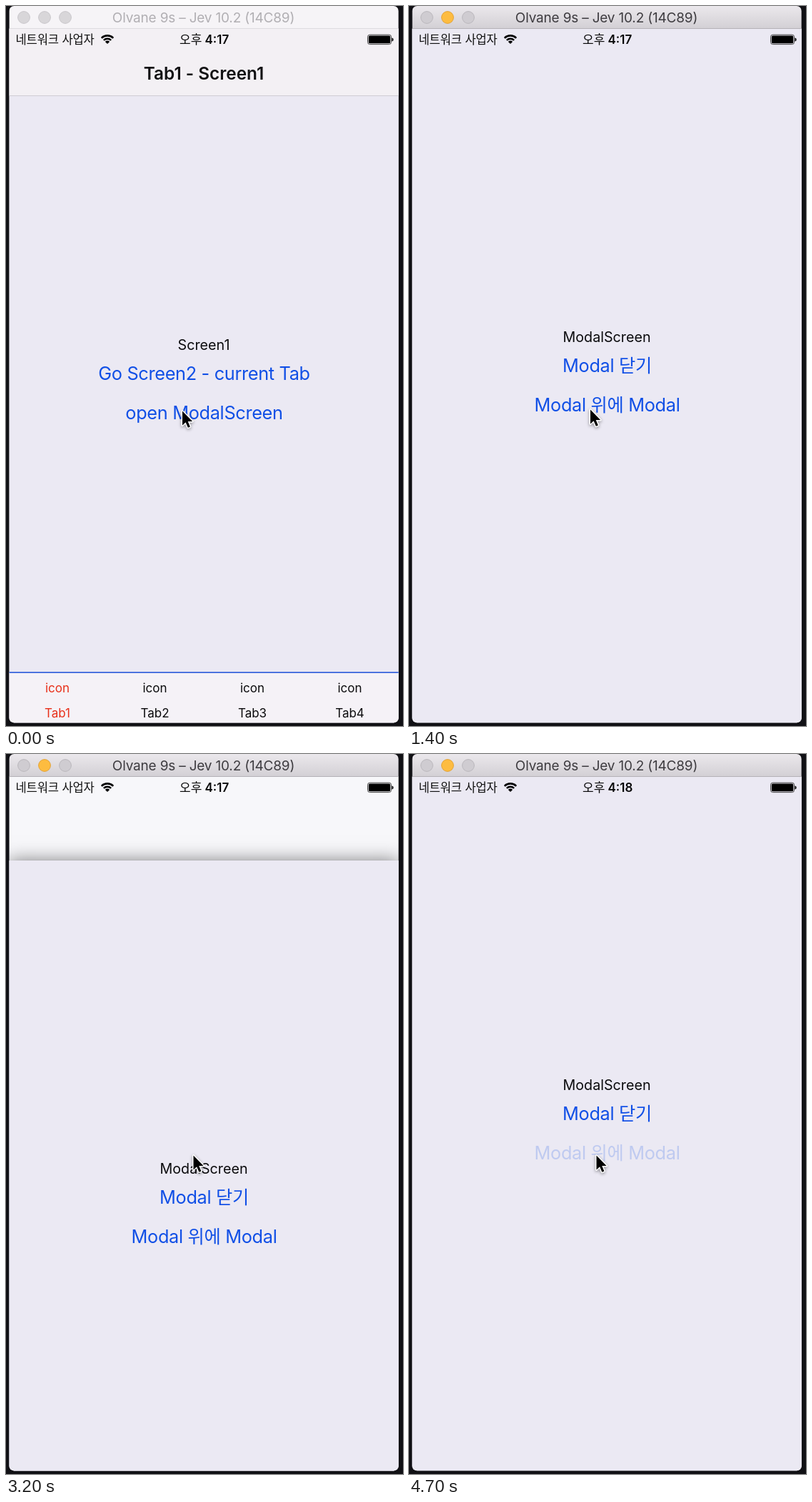
Recreate the animation shown at these times as an HTML page with a canvas. Size 556x1007 px, loop 5100 ms.

```html
<!DOCTYPE html>
<html lang="ko">
<head>
<meta charset="utf-8">
<title>Modal navigation</title>
<style>
html, body { margin: 0; width: 100%; height: 100%; overflow: hidden; background: #111115; }
canvas { display: block; width: 556px; height: 1007px; }
</style>
</head>
<body>
<canvas id="stage" width="556" height="1007"></canvas>
<script>
const ctx = document.getElementById('stage').getContext('2d');
const LOOP = 5100, STEP = 100, LAST = 4700;
const WIN = { x: 4.4, y: 0, w: 545.4, h: 1002.4 };
const TOP = 32, MID = 277.5, VIEW_H = WIN.h - TOP;
const FONT = 'Inter, "Noto Sans CJK KR", "Noto Sans CJK", sans-serif';
const BG = '#ebe9f3', BLUE = '#104fe6', INK = '#0b0b0d', RED = '#e8301a';

const clamp = v => Math.min(1, Math.max(0, v));
const mix = (a, b, k) => a + (b - a) * k;
const easeInOut = k => k < 0.5 ? 2 * k * k : 1 - 2 * (1 - k) ** 2;

// Cubic bezier easing solved by bisection.
function slideEase(x) {
  const curve = (s, a, b) => 3 * (1 - s) ** 2 * s * a + 3 * (1 - s) * s * s * b + s ** 3;
  let lo = 0, hi = 1;
  for (let i = 0; i < 24; i++) {
    const s = (lo + hi) / 2;
    if (curve(s, 0.2833, 0.31833) < x) lo = s; else hi = s;
  }
  return curve(lo, 0.99, 0.99);
}

const slide = (t, start) => slideEase(clamp((t - start) / 500));

function pressOpacity(t, down, up = Infinity) {
  if (t > up) return mix(0.2, 1, easeInOut(clamp((t - up) / 250)));
  return mix(1, 0.2, easeInOut(clamp((t - down) / 150)));
}

const cursorPath = [[0, 247, 566.5], [1200, 247, 566.5], [1400, 254, 564.5], [1800, 254, 564.5], [2200, 262.5, 561.5]];

function cursorAt(t) {
  const i = cursorPath.findIndex(k => k[0] > t);
  if (i < 0) return cursorPath[cursorPath.length - 1].slice(1);
  const [t0, x0, y0] = cursorPath[i - 1], [t1, x1, y1] = cursorPath[i];
  const k = (t - t0) / (t1 - t0);
  return [mix(x0, x1, k), mix(y0, y1, k)];
}

function rect(x, y, w, h, color) {
  ctx.fillStyle = color;
  ctx.fillRect(x, y, w, h);
}

function label(text, x, y, size, color, { weight = 400, track = 0, align = 'center' } = {}) {
  ctx.font = `${weight} ${size}px ${FONT}`;
  ctx.letterSpacing = `${track * size}px`;
  ctx.textAlign = align;
  ctx.fillStyle = color;
  ctx.fillText(text, x, y);
}

function button(text, y, opacity = 1) {
  ctx.save();
  ctx.globalAlpha *= opacity;
  label(text, MID, y, 25.3, BLUE, { track: -0.013 });
  ctx.restore();
}

const caption = (text, y) => label(text, MID - 0.5, y, 19.7, INK);

function homeScreen(opacity) {
  rect(WIN.x, TOP, WIN.w, VIEW_H, BG);
  rect(WIN.x, TOP, WIN.w, 93, '#f3f0f4');
  rect(WIN.x, 125, WIN.w, 1, '#cfcdd3');
  label('Tab1 - Screen1', MID - 0.5, 102.5, 24.3, '#111113', { weight: 600 });
  caption('Screen1', 481);
  button('Go Screen2 - current Tab', 523);
  button('open ModalScreen', 578, opacity);
  rect(WIN.x, 932, WIN.w, 71, '#f5f2f7');
  rect(WIN.x, 931.4, WIN.w, 1.45, '#1549d8');
  for (let i = 0; i < 4; i++) {
    const x = 72 + i * 136.5, color = i ? INK : RED;
    label('icon', x, 960, 17, color);
    label('Tab' + (i + 1), x, 994.5, 17, color);
  }
}

function modalScreen(opacity) {
  rect(WIN.x, TOP, WIN.w, VIEW_H, BG);
  caption('ModalScreen', 470);
  button('Modal 닫기', 512);
  button('Modal 위에 Modal', 567, opacity);
}

// The lower card fades towards white while the upper one slides in.
function stack(progress, lower, upper) {
  rect(WIN.x, TOP, WIN.w, VIEW_H, '#fff');
  ctx.save();
  ctx.globalAlpha = mix(1, 0.3, progress);
  lower();
  ctx.restore();
  if (progress <= 0) return;
  const offset = Math.round((1 - progress) * VIEW_H);
  ctx.save();
  ctx.translate(0, offset);
  ctx.shadowColor = 'rgba(0,0,0,0.5)';
  ctx.shadowBlur = 24;
  rect(WIN.x, TOP, WIN.w, VIEW_H, BG);
  ctx.shadowColor = 'transparent';
  upper();
  ctx.restore();
}

function wifi(x, y) {
  ctx.fillStyle = '#000';
  for (const [inner, outer] of [[0, 4.4], [6, 8.5], [10.3, 12.9]]) {
    ctx.beginPath();
    ctx.arc(x, y, outer, -Math.PI * 0.75, -Math.PI * 0.25);
    ctx.arc(x, y, inner, -Math.PI * 0.25, -Math.PI * 0.75, true);
    ctx.fill();
  }
}

function roundBox(x, y, w, h, r) {
  ctx.beginPath();
  ctx.roundRect(x, y, w, h, r);
}

function statusBar(time) {
  label('네트워크 사업자', 13.5, 52.5, 16.6, '#111', { align: 'left', track: -0.01 });
  wifi(142, 53);
  label('오후', 243, 53, 17, '#080808', { weight: 500, align: 'left' });
  label(time, 278.5, 53, 17, '#080808', { weight: 600, align: 'left' });
  ctx.strokeStyle = '#444';
  ctx.lineWidth = 1;
  roundBox(506.5, 40.2, 33, 13.4, 3);
  ctx.stroke();
  ctx.fillStyle = '#000';
  roundBox(507.8, 41.5, 30.4, 10.8, 1.5);
  ctx.fill();
  roundBox(540.5, 44.5, 2, 5, [0, 2, 2, 0]);
  ctx.fill();
}

function titleBar(active) {
  const shade = ctx.createLinearGradient(0, 0, 0, 31);
  shade.addColorStop(0, active ? '#ebe8ec' : '#f6f4f7');
  shade.addColorStop(1, active ? '#d3d0d5' : '#f6f4f7');
  rect(WIN.x, 0, WIN.w, TOP, shade);
  rect(WIN.x, 31, WIN.w, 1, active ? '#b4b1b7' : '#dedce0');
  for (let i = 0; i < 3; i++) {
    const lit = active && i === 1;
    ctx.beginPath();
    ctx.arc(25 + i * 29, 16, 8.4, 0, Math.PI * 2);
    ctx.fillStyle = lit ? '#fdbc40' : active ? '#cfccd1' : '#d8d6d9';
    ctx.fill();
    ctx.strokeStyle = lit ? '#e2a237' : active ? '#bab7bc' : '#c8c6ca';
    ctx.lineWidth = 1;
    ctx.stroke();
  }
  label('Olvane 9s – Jev 10.2 (14C89)', 276.5, 23.3, 19, active ? '#3e3c40' : '#b1afb3', { track: -0.01 });
}

function cursor(x, y) {
  const arrow = new Path2D('M0 0V16L3.7 12.5L6.3 18.5L8.7 17.5L6.2 11.6H11.3Z');
  ctx.save();
  ctx.translate(x, y);
  ctx.scale(1.25, 1.25);
  ctx.lineJoin = 'round';
  ctx.lineWidth = 2.4;
  ctx.strokeStyle = '#fff';
  ctx.shadowColor = 'rgba(0,0,0,0.4)';
  ctx.shadowBlur = 4;
  ctx.shadowOffsetY = 1.5;
  ctx.stroke(arrow);
  ctx.shadowColor = 'transparent';
  ctx.fillStyle = '#000';
  ctx.fill(arrow);
  ctx.restore();
}

function draw(t) {
  rect(0, 0, 556, 1007, '#111115');
  ctx.save();
  roundBox(WIN.x, WIN.y, WIN.w, WIN.h, 7);
  ctx.clip();
  const first = () => modalScreen(pressOpacity(t, 2480, 2960));
  if (t < 3000) {
    stack(slide(t, 299), () => homeScreen(pressOpacity(t, 80, 290)), first);
  } else {
    stack(slide(t, 3018), first, () => modalScreen(pressOpacity(t, 4480)));
  }
  statusBar(t < 4200 ? '4:17' : '4:18');
  titleBar(t >= 100);
  ctx.restore();
  cursor(...cursorAt(t));
}

const began = performance.now();
function tick() {
  const t = (performance.now() - began) % LOOP;
  draw(Math.min(LAST, Math.floor(t / STEP) * STEP));
  requestAnimationFrame(tick);
}
tick();
</script>
</body>
</html>
```
